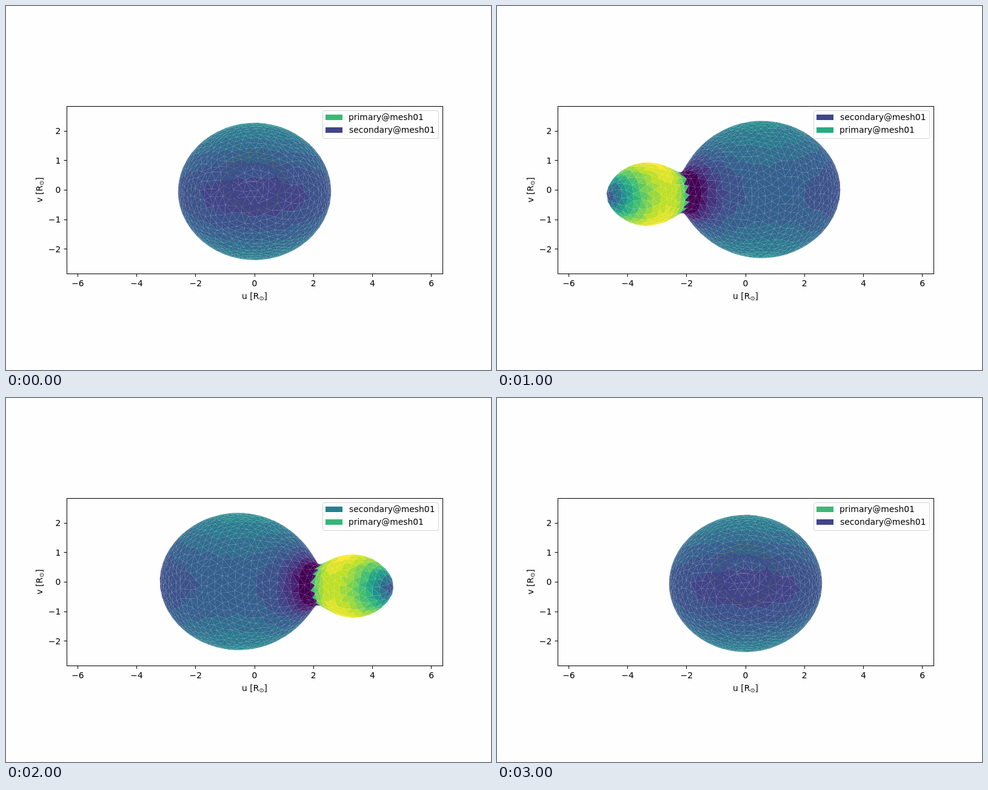
Write an HTML page with a canvas that moves like this. It is 800 px wide and 600 px high and loops after 3100 ms.

```html
<!DOCTYPE html>
<html lang="en">
<head>
<meta charset="utf-8">
<title>Contact binary mesh</title>
<style>
  html, body { margin: 0; width: 800px; height: 600px; overflow: hidden; background: #fefefe; }
  canvas, svg { position: absolute; left: 0; top: 0; display: block; }
  text { font: 13.89px "DejaVu Sans", sans-serif; fill: #000; }
  .sub { font-size: 9.72px; }
  .mid { text-anchor: middle; }
  .end { text-anchor: end; }
  .axis { fill: none; stroke: #000; stroke-width: 1; }
</style>
</head>
<body>
<canvas id="stage" width="800" height="600"></canvas>
<svg width="800" height="600" viewBox="0 0 800 600">
  <rect class="axis" x="100.5" y="165.5" width="620" height="276"/>
  <g id="ticks"></g>
  <text class="mid" x="410" y="483">u [R<tspan class="sub" dy="2.1">⊙</tspan><tspan dy="-2.1">]</tspan></text>
  <text class="mid" transform="translate(60 303) rotate(-90)">v [R<tspan class="sub" dy="2.1">⊙</tspan><tspan dy="-2.1">]</tspan></text>
  <rect x="522.5" y="172.5" width="191" height="46" rx="2.8" fill="#fefefe" stroke="#d4d4d4"/>
  <rect id="patch0" x="527" y="179" width="28" height="9"/>
  <rect id="patch1" x="527" y="200" width="28" height="9"/>
  <text id="label0" y="188"></text>
  <text id="label1" y="209"></text>
</svg>
<script>
const $ = id => document.getElementById(id);
const ctx = $('stage').getContext('2d');
const { sin, cos, PI, sqrt, round, floor, min, max, log } = Math;

const STEP = 100, STEPS = 31;
const CX = 410, CY = 303.5, SCALE = 48.62;

// Roche model: heavy star at x = 0, light star at x = 1
const Q = 0.156, LEVEL = 2.03, SEP = 4.4, COM = Q / (1 + Q);
const INCL = 86 * PI / 180, SI = sin(INCL), CI = cos(INCL);
const EDGE = 0.061, NECK = 0.69;

const VIRIDIS = ['440154', '482475', '414487', '355f8d', '2a788e', '21918c',
  '22a884', '44bf70', '7ad151', 'bddf26', 'fde725']
  .map(h => [0, 2, 4].map(i => parseInt(h.slice(i, i + 2), 16)));

function viridis(v) {
  const p = min(max(v, 0), 1) * 10, i = min(floor(p), 9);
  return 'rgb(' + VIRIDIS[i].map((c, n) => round(c + (VIRIDIS[i + 1][n] - c) * (p - i))) + ')';
}

let seed = 7;
function random() {
  seed = (seed * 16807) % 2147483647;
  return seed / 2147483647;
}

const dot = (a, b) => a[0] * b[0] + a[1] * b[1] + a[2] * b[2];
const sub = (a, b) => a.map((v, k) => v - b[k]);
const cross = (a, b) => [a[1] * b[2] - a[2] * b[1], a[2] * b[0] - a[0] * b[2], a[0] * b[1] - a[1] * b[0]];

function potential(x, y, z) {
  const s = y * y + z * z;
  return 1 / sqrt(x * x + s) + Q * (1 / sqrt((x - 1) ** 2 + s) - x) + (1 + Q) / 2 * (x * x + y * y);
}

// Outward gravity vector
function gravity([x, y, z]) {
  const s = y * y + z * z;
  const a = (x * x + s) ** -1.5, b = Q * ((x - 1) ** 2 + s) ** -1.5;
  return [x * a + (x - 1) * b + Q - (1 + Q) * x, y * (a + b - 1 - Q), z * (a + b)];
}

// Where f falls to the surface level between inside and outside
function surface(f, inside, outside) {
  for (let i = 0; i < 40; i++) {
    const m = (inside + outside) / 2;
    if (f(m) > LEVEL) inside = m; else outside = m;
  }
  return inside;
}

const radius = (x, phi) => surface(r => potential(x, r * cos(phi), r * sin(phi)), 0, 0.62);

function buildRings() {
  const back = surface(x => potential(x, 0, 0), -0.3, -0.8);
  const tip = surface(x => potential(x, 0, 0), 1.1, 1.4);
  const path = [[0, back, 0]];
  for (let i = 1; i <= 600; i++) {
    const x = (back + tip) / 2 - (tip - back) / 2 * cos(PI * i / 600);
    const r = i < 600 ? radius(x, PI / 2) : 0;
    const [s, px, pr] = path[i - 1];
    path.push([s + Math.hypot(x - px, r - pr), x, r]);
  }
  const total = path[600][0], count = round(total / (EDGE * 0.866));
  const rings = [];
  for (let j = 0; j <= count; j++) {
    if (j === 0 || j === count) {
      rings.push({ x: j ? tip : back, off: 0, pts: [[j ? tip : back, 0, 0]] });
      continue;
    }
    const [, x, r] = path.find(p => p[0] >= total * j / count);
    const hex = 6 * min(j, count - j), n = min(hex, round(2 * PI * r / EDGE));
    const free = n < hex;
    const off = free ? random() * 0.8 / n : 0;
    const pts = [];
    for (let i = 0; i < n; i++) {
      const wobble = free ? 0.25 : 0;
      const phi = 2 * PI * (off + (i + wobble * (random() - 0.5)) / n);
      const px = x + wobble * EDGE * (random() - 0.5);
      const pr = radius(px, phi);
      pts.push([px, pr * cos(phi), pr * sin(phi)]);
    }
    rings.push({ x, off, pts });
  }
  return rings;
}

// Gravity darkening in steps of the colour map
function shade(g, big) {
  const l = log(g);
  const v = big ? min(0.25 + 0.36 * (l - 0.74), 0.45) : 0.9 + 0.42 * (l - 0.83);
  return viridis(round(v * 20) / 20);
}

function buildMesh() {
  const rings = buildRings(), mesh = [];
  const add = (big, ...tri) => {
    const [a, b, c] = tri;
    const mid = a.map((v, k) => (v + b[k] + c[k]) / 3);
    const g = gravity(mid);
    let n = cross(sub(b, a), sub(c, a));
    if (dot(n, g) < 0) n = n.map(v => -v);
    mesh.push({ tri, mid, n, color: shade(Math.hypot(...g), big) });
  };
  const split = rings.findIndex(r => r.x > NECK);
  for (let r = 0; r + 1 < rings.length; r++) {
    const A = rings[r], B = rings[r + 1], a = A.pts, b = B.pts;
    const na = a.length > 1 ? a.length : 0, nb = b.length > 1 ? b.length : 0;
    let i = 0, j = 0;
    while (i < na || j < nb) {
      const stepA = j === nb || (i < na && (i + 1) / na + A.off <= (j + 1) / nb + B.off);
      const pa = a[i % a.length], pb = b[j % b.length];
      if (stepA) add(r <= split, pa, a[++i % a.length], pb);
      else add(r < split, pb, b[++j % b.length], pa);
    }
  }
  return mesh;
}

const mesh = buildMesh();

function drawStars(theta) {
  const s = sin(theta), c = cos(theta);
  const depth = ([x, y, z]) => (-x * c - y * s) * SI + z * CI;
  const project = ([x, y, z]) => {
    const X = (x - COM) * SEP, Y = y * SEP, Z = z * SEP;
    return [CX + SCALE * (Y * c - X * s), CY - SCALE * (Z * SI + (X * c + Y * s) * CI)];
  };
  ctx.clearRect(0, 0, 800, 600);
  const seen = mesh.filter(f => depth(f.n) > 0);
  for (const f of seen) f.d = depth(f.mid);
  seen.sort((f, g) => f.d - g.d);
  for (const f of seen) {
    ctx.fillStyle = f.color;
    ctx.beginPath();
    for (const p of f.tri) ctx.lineTo(...project(p));
    ctx.closePath();
    ctx.fill();
  }
}

// Legend tones: [step, primary, secondary]
const TONES = [[0, 0.67, 0.2], [5, 0.62, 0.2], [10, 0.615, 0.21], [16, 0.6, 0.38],
  [20, 0.66, 0.43], [25, 0.66, 0.21], [30, 0.67, 0.2]];

function tone(k, col) {
  const i = max(1, TONES.findIndex(t => t[0] >= k));
  const a = TONES[i - 1], b = TONES[i];
  return viridis(a[col] + (b[col] - a[col]) * (k - a[0]) / (b[0] - a[0]));
}

function drawLegend(k) {
  const items = [['primary@mesh01', 565, tone(k, 1)], ['secondary@mesh01', 566, tone(k, 2)]];
  if (k > 7 && k < 23) items.reverse();
  items.forEach(([name, x, color], i) => {
    $('label' + i).textContent = name;
    $('label' + i).setAttribute('x', x);
    $('patch' + i).setAttribute('fill', color);
  });
}

function drawTicks() {
  const name = v => String(v).replace('-', '−');
  let out = '';
  for (let u = -6; u <= 6; u += 2) {
    const x = CX + u * 48.6;
    out += `<path class="axis" d="M${floor(x) + 0.5} 442v4.5"/><text class="mid" x="${x}" y="462">${name(u)}</text>`;
  }
  for (let v = -2; v <= 2; v++) {
    const y = 303.4 - v * SCALE;
    out += `<path class="axis" d="M100 ${floor(y) + 0.5}h-4.5"/><text class="end" x="90.3" y="${round(y + 5)}">${name(v)}</text>`;
  }
  $('ticks').innerHTML = out;
}

let shown = -1;
function tick() {
  const k = floor(performance.now() / STEP) % STEPS;
  if (k !== shown) {
    shown = k;
    drawStars(2 * PI * k / (STEPS - 1));
    drawLegend(k);
  }
  requestAnimationFrame(tick);
}

drawTicks();
tick();
</script>
</body>
</html>
```
